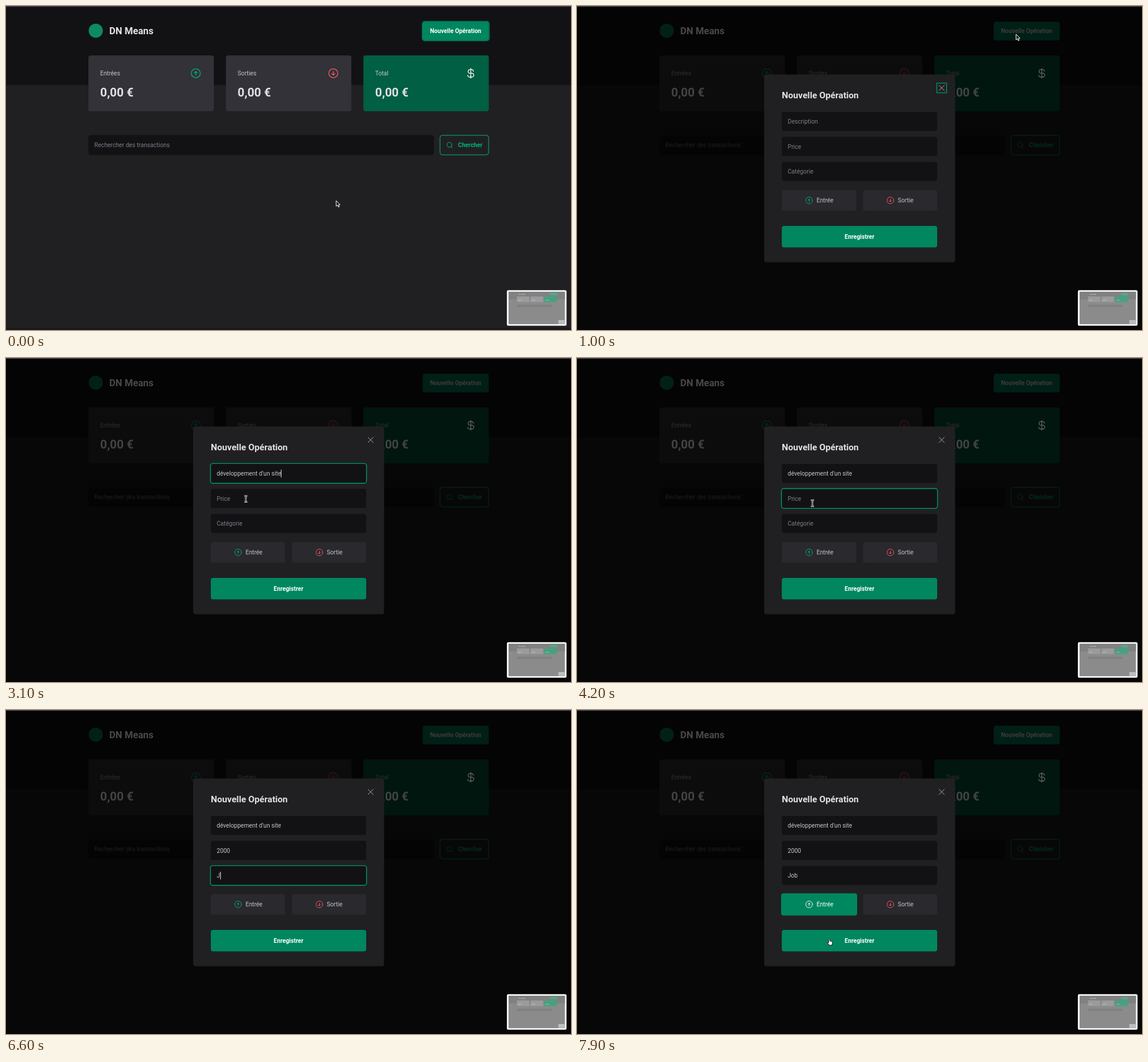
An HTML page with a canvas for the animation above (8 s loop, 960x551 px).

```html
<!DOCTYPE html>
<html lang="fr">
<head>
<meta charset="utf-8">
<title>Nouvelle Opération</title>
<style>
html, body { margin: 0; width: 960px; height: 551px; overflow: hidden; background: #202022; }
canvas { display: block; }
</style>
</head>
<body>
<canvas id="stage" width="960" height="551"></canvas>
<script>
const ctx = document.getElementById('stage').getContext('2d');
const LOOP = 8000, STEP = 100, NAME = 'DN Means';
const GREEN = '#00875f', DARK_GREEN = '#015f43', LIGHT_GREEN = '#00b37e', RED = '#f75a68';
const BLACK = '#121214', PALE = '#c4c4cc', WHITE = '#e1e1e6', GREY = '#7c7c8a';

// Icons on a 256 grid
const UP = new Path2D('M224 128a96 96 0 1 1-192 0a96 96 0 1 1 192 0M94 122l34-34l34 34M128 168V88');
const DOWN = new Path2D('M224 128a96 96 0 1 1-192 0a96 96 0 1 1 192 0M94 134l34 34l34-34M128 88v80');
const DOLLAR = new Path2D('M128 24v208M184 88a40 40 0 0 0-40-40H112a40 40 0 0 0 0 80h40a40 40 0 0 1 0 80H104a40 40 0 0 1-40-40');
const GLASS = new Path2D('M200 116a84 84 0 1 1-168 0a84 84 0 1 1 168 0M175 175l49 49');
const CROSS = new Path2D('M56 56L200 200M200 56L56 200');

// Pointers with the hot spot at 0,0
const ARROW = new Path2D('M0 0V9.6L2.2 7.6L3.8 11L5.3 10.3L3.8 7H6.7Z');
const HAND = new Path2D('M-1 1Q0-.6 1 1V4Q2 3.4 2.7 4.3Q3.7 3.8 4.3 4.8Q5.6 4.4 5.6 6Q5.6 8.6 4.6 11H-.2Q-1.2 8.8-3 7.2Q-3 5.8-1 7Z');
const BEAM = new Path2D('M-2.6-5.2Q0-5.2 0-3.6Q0-5.2 2.6-5.2M0-3.6V3.6M-2.6 5.2Q0 5.2 0 3.6Q0 5.2 2.6 5.2M-1.4 1H1.4');

const fieldTops = [180, 222.6, 265.2];
const hints = ['Description', 'Price', 'Catégorie'];
const carets = [1800, 2200, 3600, 3900, 4200, 4300, 5100, 5500, 6100, 6400];
const moves = [ // start, end, x, y
  [0, 0, 561, 331], [300, 900, 746, 48], [1000, 1600, 450, 201], [1700, 1800, 447, 201],
  [2800, 3300, 400, 247], [5000, 5700, 397, 284], [7200, 7500, 412, 333], [7600, 7900, 428.5, 389]
];
const typing = [[2500, 2800], [4300, 5100], [6600, 7300]];

function box(x, y, w, h, fill, r = 4) {
  ctx.fillStyle = fill;
  ctx.beginPath();
  ctx.roundRect(x, y, w, h, r);
  ctx.fill();
}

function ring(x, y, w, h, color, width, r = 4) {
  ctx.strokeStyle = color;
  ctx.lineWidth = width;
  ctx.beginPath();
  ctx.roundRect(x, y, w, h, r);
  ctx.stroke();
}

function text(s, x, y, color, size = 10.15, weight = 400, align = 'left') {
  ctx.font = `${weight} ${size}px Roboto, sans-serif`;
  ctx.textAlign = align;
  ctx.fillStyle = color;
  ctx.fillText(s, x, y);
}

function icon(path, x, y, size, color, width = 16) {
  ctx.save();
  ctx.translate(x, y);
  ctx.scale(size / 256, size / 256);
  ctx.translate(-128, -128);
  ctx.lineWidth = width;
  ctx.lineCap = ctx.lineJoin = 'round';
  ctx.strokeStyle = color;
  ctx.stroke(path);
  ctx.restore();
}

const passed = (times, t) => times.filter(s => s <= t).length;
const inside = (p, x, y, w, h) => p.x >= x && p.x <= x + w && p.y >= y && p.y <= y + h;

function pointerAt(t) {
  let [, , x, y] = moves[0];
  for (const [start, end, toX, toY] of moves.slice(1)) {
    if (t <= start) break;
    const p = Math.min(1, (t - start) / (end - start));
    const k = 1 - (1 - p) ** 2;
    x += (toX - x) * k;
    y += (toY - y) * k;
  }
  return { x, y };
}

function pointerShape(p, open) {
  if (!open) {
    if (inside(p, 140, 219, 587, 34)) return BEAM;
    return inside(p, 708, 27, 112, 32) || inside(p, 737, 219, 83, 34) ? HAND : ARROW;
  }
  if (fieldTops.some(y => inside(p, 348, y, 264, 32.4))) return BEAM;
  const onButton = inside(p, 348, 313, 126, 35) || inside(p, 486, 313, 126, 35) ||
    inside(p, 348, 374, 264, 37);
  return onButton ? HAND : ARROW;
}

function drawPointer(p, shape) {
  ctx.save();
  ctx.translate(p.x, p.y);
  ctx.lineJoin = 'round';
  if (shape === BEAM) {
    ctx.strokeStyle = '#eee';
    ctx.lineWidth = 2.4;
    ctx.stroke(BEAM);
    ctx.strokeStyle = '#111';
    ctx.lineWidth = .8;
  } else {
    ctx.fillStyle = shape === HAND ? '#fff' : '#111';
    ctx.strokeStyle = shape === HAND ? '#111' : '#fff';
    ctx.lineWidth = 1;
    ctx.fill(shape);
  }
  ctx.stroke(shape);
  ctx.restore();
}

function headings(nameColor, color) {
  text(NAME, 175.5, 48.1, nameColor, 16.2, 700);
  for (const x of [160, 393.6, 627.3]) text('0,00 €', x, 153.6, color, 20.3, 700);
}

function drawPage(open, hover) {
  box(0, 0, 960, 551, '#202022', 0);
  box(0, 0, 960, 134.5, BLACK, 0);
  box(0, 547, 960, 4, '#1e181a', 0);
  ctx.fillStyle = '#0e8a62';
  ctx.beginPath();
  ctx.arc(152.5, 42, 12, 0, 7);
  ctx.fill();

  box(708, 26.8, 112.3, 31.6, hover ? DARK_GREEN : GREEN);
  if (!open) ring(707.3, 26.2, 113.7, 32.8, hover ? '#00966a' : GREEN, 1.3);
  text('Nouvelle Opération', 764, 46.2, '#fff', 10.15, 700, 'center');

  [['Entrées', UP, LIGHT_GREEN], ['Sorties', DOWN, RED], ['Total', DOLLAR, '#fff']]
    .forEach(([label, path, color], i) => {
      const x = 140 + i * 233.6;
      box(x, 84, 213.2, 95, i === 2 ? DARK_GREEN : '#323238');
      text(label, x + 20, 118, PALE);
      icon(path, x + 182.5, 114.4, 20.3, color);
    });
  headings(WHITE, WHITE);

  box(140, 219.4, 587, 34, BLACK);
  text('Rechercher des transactions', 150, 240.2, GREY);
  ring(737.4, 219.9, 82.6, 33.2, LIGHT_GREEN, 1);
  icon(GLASS, 754, 236.6, 12.7, LIGHT_GREEN, 20);
  text('Chercher', 768, 240.2, LIGHT_GREEN, 10.15, 700);
}

function drawModal(t) {
  const values = [
    "développement d'un site".slice(0, Math.max(0, (t - 2400) / STEP * 6)),
    '2000'.slice(0, passed([4300, 4400, 4600, 4700], t)),
    'Job'.slice(0, passed([6600, 6800, 7000], t))
  ];
  const focus = passed([1500, 3200, 5500, 7600], t) - 1;
  const caretOn = passed(carets, t) % 2 === 0;
  const chosen = focus === 3;

  box(318, 116.6, 324.4, 319.2, '#202022');
  text('Nouvelle Opération', 348, 156.5, WHITE, 15.2, 700);
  icon(CROSS, 619.6, 139.3, 16, '#a9a9b2');
  if (focus < 0) ring(611.4, 131.1, 16.6, 16.6, '#00966a', 1.3, 0);

  values.forEach((value, i) => {
    const y = fieldTops[i];
    box(348, y, 264, 32.4, BLACK);
    text(value || hints[i], 358, y + 20.1, value ? PALE : GREY);
    if (i !== focus) return;
    ring(347.4, y - .6, 265.2, 33.6, '#00966a', 1.4);
    const end = value ? ctx.measureText(value).width : 0;
    if (caretOn) box(Math.round(358 + end), Math.round(y + 10), 1, 13, WHITE, 0);
  });

  if (chosen) box(346.8, 311.8, 129.2, 37.6, GREEN);
  else box(348, 313, 126.2, 35.2, '#29292e');
  icon(UP, 394.4, 330.6, 15.2, chosen ? '#fff' : LIGHT_GREEN);
  text('Entrée', 407, 334.2, chosen ? '#fff' : PALE);
  box(486, 313, 126, 35.2, '#29292e');
  icon(DOWN, 532.4, 330.6, 15.2, RED);
  text('Sortie', 545, 334.2, PALE);

  box(348, 374, 264, 36.6, GREEN);
  text('Enregistrer', 480, 396.2, '#fff', 10.15, 700, 'center');
}

function drawThumbnail() {
  box(851, 483.3, 101.4, 60.4, '#f4f4f4', 2.5);
  box(854, 486, 95.6, 55, '#8b8b8b', 0);
  box(854, 486, 95.6, 13, '#818182', 0);
  text(NAME, 871, 491.3, '#eee', 2.4, 700);
  box(924.5, 488.3, 11.5, 3.6, '#46b08a', .5);
  [868, 891.3, 914.6].forEach((x, i) => {
    box(x, 494, 21.4, 9.6, i === 2 ? '#44a37f' : '#9b9b9e', .5);
    text('0,00 €', x + 2, 500.8, '#f2f2f2', 2.2, 700);
  });
  box(868, 508, 59, 3.4, '#808081', .5);
  ring(928.5, 508.2, 7.5, 3, '#809c90', .4, .5);
  box(938.5, 534, 11, 6.8, '#bdbdbd', 1);
}

function frame(now) {
  const t = Math.floor(now % LOOP / STEP) * STEP;
  const open = t >= 1000;
  const p = pointerAt(t), shape = pointerShape(p, open);
  drawPage(open, !open && shape === HAND);
  if (open) {
    box(0, 0, 960, 551, 'rgba(0,0,0,.77)', 0);
    headings('rgba(255,255,255,.1)', 'rgba(255,255,255,.08)');
    icon(DOLLAR, 789.7, 114.4, 20.3, 'rgba(255,255,255,.2)');
    drawModal(t);
  }
  box(0, 0, 960, 1.3, '#4c4b5c', 0);
  if (!typing.some(([from, to]) => t >= from && t < to)) drawPointer(p, shape);
  drawThumbnail();
  requestAnimationFrame(frame);
}

const begin = performance.now();
const loop = frame;
frame = now => loop(Math.max(0, now - begin));
requestAnimationFrame(frame);
</script>
</body>
</html>
```
